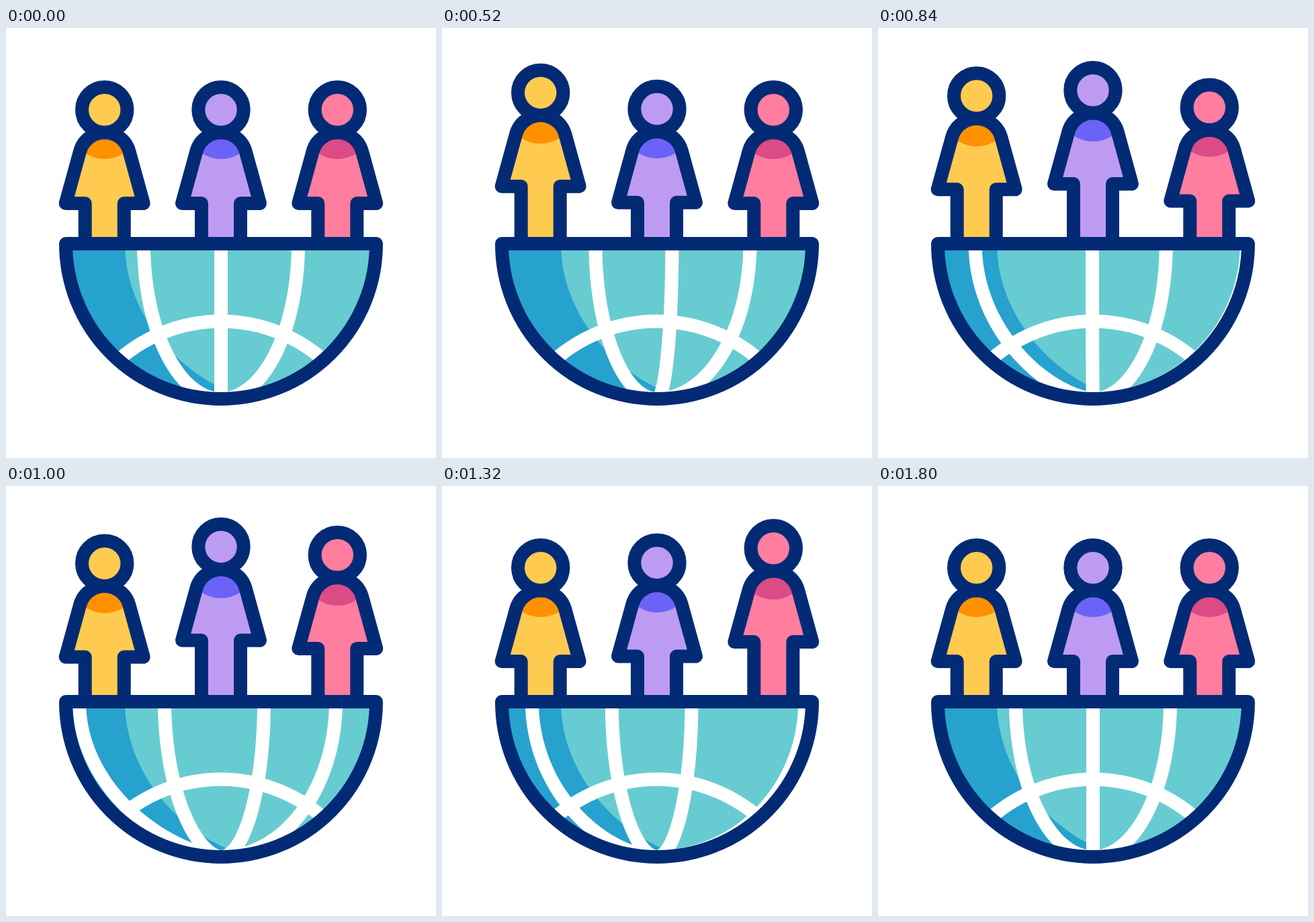
Animation, 640 px wide and 640 px high, one loop 2 s. Source, as an HTML page with a canvas:

```html
<!DOCTYPE html>
<html lang="en">
<head>
<meta charset="utf-8">
<title>People on a turning globe</title>
<style>
  html, body { margin: 0; width: 100%; height: 100%; overflow: hidden; background: #fff; }
  canvas { display: block; width: 100vmin; height: 100vmin; margin: auto; }
</style>
</head>
<body>
<canvas id="stage" width="640" height="640"></canvas>
<script>
const ctx = document.getElementById('stage').getContext('2d');
const LOOP = 2000, STEP = 40, REST = 1800;
const NAVY = '#032b75', TEAL = '#67ccd1', BLUE = '#27a2ce', WHITE = '#fff';
const CX = 320, CY = 321, R = 231;

// rise: start, top and end of each hop in ms
const people = [
  { x: 146.7, fill: '#fecb50', collar: '#ff9100', rise: [205, 640, 1157], height: 30.8 },
  { x: 320, fill: '#bd9bf3', collar: '#6b63f8', rise: [463, 938, 1500], height: 32.2 },
  { x: 493.3, fill: '#ff7d9f', collar: '#db4b85', rise: [740, 1205, 1762], height: 32.2 }
];

// Meridians leaving to the right, and their followers arriving from the left
const leaving = [[100, 0], [360, 5], [680, 59], [1000, 179], [1160, 250], [1600, 440]];
const arriving = [[400, -600], [680, -390], [1000, -199], [1160, -119.5], [1480, -22], [1800, 0]];
const leaveScale = [1, 0.955, 1];
const arriveScale = [1.12, 1.06, 1];

const clamp = (v, lo, hi) => Math.min(hi, Math.max(lo, v));
const ease = s => (1 - Math.cos(Math.PI * clamp(s, 0, 1))) / 2;

// Smooth monotone curve through [time, value] points
function curve(pts, t) {
  const last = pts.length - 1;
  if (t <= pts[0][0]) return pts[0][1];
  if (t >= pts[last][0]) return pts[last][1];
  const rate = i => (pts[i + 1][1] - pts[i][1]) / (pts[i + 1][0] - pts[i][0]);
  const slope = i => {
    if (i === 0 || i === last) return 0;
    const mean = (pts[i + 1][1] - pts[i - 1][1]) / (pts[i + 1][0] - pts[i - 1][0]);
    return Math.min(mean, 3 * rate(i - 1), 3 * rate(i));
  };
  let i = 0;
  while (t > pts[i + 1][0]) i++;
  const span = pts[i + 1][0] - pts[i][0];
  const s = (t - pts[i][0]) / span, s2 = s * s, s3 = s2 * s;
  return pts[i][1] + (pts[i + 1][1] - pts[i][1]) * (3 * s2 - 2 * s3)
    + span * (slope(i) * (s3 - 2 * s2 + s) + slope(i + 1) * (s3 - s2));
}

function stroke(color) {
  ctx.strokeStyle = color;
  ctx.lineWidth = 20;
  ctx.stroke();
}

function disc(x, y, r, color) {
  ctx.beginPath();
  ctx.arc(x, y, r, 0, 2 * Math.PI);
  ctx.fillStyle = color;
  ctx.fill();
}

function bodyPath(up) {
  const hem = 261 - up, neck = 193.5 - up, tilt = 0.27;
  ctx.beginPath();
  ctx.moveTo(-29, 321);
  ctx.lineTo(-29, hem);
  ctx.lineTo(-58, hem);
  ctx.arc(0, neck, 38, Math.PI + tilt, -tilt);
  ctx.lineTo(58, hem);
  ctx.lineTo(29, hem);
  ctx.lineTo(29, 321);
}

function drawPerson(p, t) {
  const [start, top, end] = p.rise;
  const up = p.height * (t < top ? ease((t - start) / (top - start)) : ease((end - t) / (end - top)));
  ctx.save();
  ctx.translate(p.x, 0);
  bodyPath(up);
  ctx.fillStyle = p.fill;
  ctx.fill();
  ctx.save();
  ctx.clip();
  disc(0, 143 - up * 0.9, 52, p.collar);
  ctx.restore();
  bodyPath(up);
  stroke(NAVY);
  disc(0, 121.7 - up, 33.7, p.fill);
  stroke(NAVY);
  ctx.restore();
}

// Half ellipse from the rim to the pole; power 0.5 is a true ellipse
function meridian(x, power) {
  ctx.beginPath();
  for (let i = 0; i <= 60; i++) {
    const u = Math.sin(Math.PI / 2 * i / 60);
    ctx.lineTo(CX + (x - CX) * Math.pow(Math.max(0, 1 - u * u), power), CY + R * u);
  }
  stroke(WHITE);
}

function drawGlobe(t) {
  ctx.save();
  ctx.beginPath();
  ctx.arc(CX, CY, R - 4, 0, Math.PI);
  ctx.clip();
  ctx.fillStyle = TEAL;
  ctx.fillRect(80, CY, 480, 240);

  ctx.beginPath();
  ctx.moveTo(177, CY);
  ctx.bezierCurveTo(177, 421, 250, 507, 332, 541);
  ctx.lineTo(332, 562);
  ctx.lineTo(80, 562);
  ctx.lineTo(80, CY);
  ctx.fillStyle = BLUE;
  ctx.fill();

  ctx.beginPath();
  ctx.arc(CX, 667.5, R, 0, 2 * Math.PI);
  stroke(WHITE);

  const out = curve(leaving, t), into = curve(arriving, t);
  for (let i = 0; i < 3; i++) {
    const home = CX + (i - 1) * 115;
    if (t < REST) meridian(home + out * leaveScale[i], 0.5);
    const left = into * arriveScale[i], x = home + left;
    const bend = Math.min(1, -left / 125) * Math.min(1, Math.abs(x - CX) / 120) ** 2;
    meridian(x, 0.5 + 0.15 * bend);
  }
  ctx.restore();

  ctx.beginPath();
  ctx.arc(CX, CY, R, 0, Math.PI);
  ctx.closePath();
  stroke(NAVY);
}

function draw(now) {
  const t = Math.min(REST, Math.floor((now % LOOP) / STEP) * STEP);
  ctx.fillStyle = WHITE;
  ctx.fillRect(0, 0, 640, 640);
  ctx.lineJoin = 'round';
  people.forEach(p => drawPerson(p, t));
  drawGlobe(t);
}

const begin = performance.now();
function tick() {
  draw(performance.now() - begin);
  requestAnimationFrame(tick);
}
tick();
</script>
</body>
</html>
```
